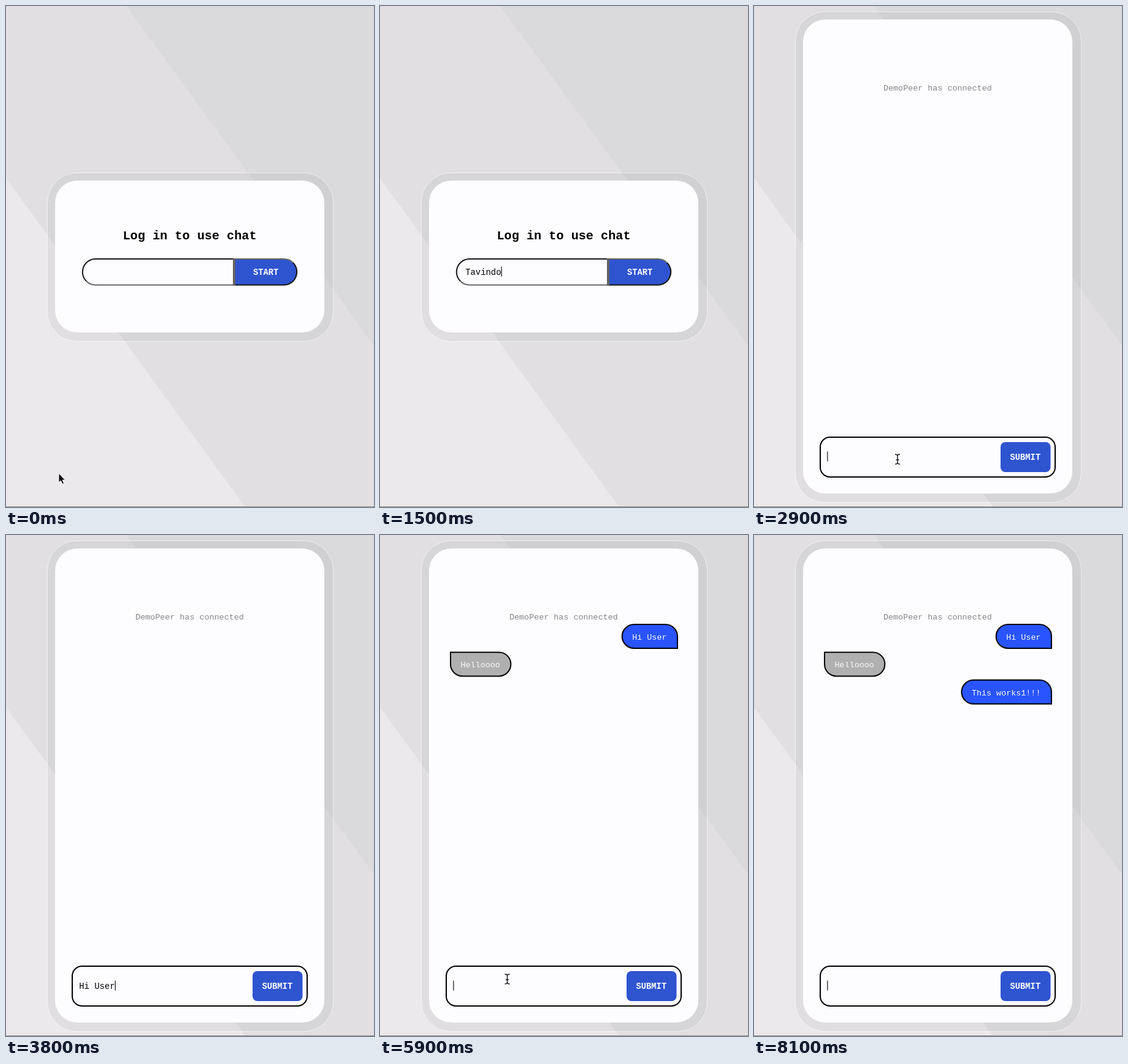
An HTML page that plays this animation: 600x818 px, repeating every 8200 ms.

```html
<!DOCTYPE html>
<html lang="en">
<head>
<meta charset="utf-8">
<title>Chat login</title>
<style>
  html, body { margin: 0; width: 100%; height: 100%; overflow: hidden; }
  svg { display: block; width: 600px; height: 818px; }
  text { font: 13.4px "Liberation Mono", "Courier New", monospace; white-space: pre; }
  .typed { font-size: 13.9px; }
  .label { font-size: 13.8px; font-weight: bold; fill: #fff; }
  .ring { fill: rgba(0, 0, 0, .046); stroke: rgba(255, 255, 255, .55); }
  .card { fill: #fdfcfe; }
  .button { fill: #2f54d0; }
  .line { fill: none; stroke-width: 2; }
  .dark { stroke: #161616; }
  .grey { stroke: #666; }
  .bubble { stroke: #000; stroke-width: 2; }
</style>
</head>
<body>
<svg viewBox="0 0 600 818">
  <rect width="600" height="818" fill="#e1dfe2"/>
  <path d="M196 0H600V554Z" fill="#dad9db"/>
  <path d="M0 281L390 818H0Z" fill="#ebe9ec"/>

  <g id="login">
    <rect class="ring" x="67.5" y="272.5" width="466" height="275" rx="48"/>
    <rect class="card" x="80" y="285" width="439" height="248" rx="36"/>
    <text x="190.5" y="381" style="font-size:20.2px;font-weight:bold">Log in to use chat</text>
    <path class="button" d="M372 413H453A21.2 21.2 0 0 1 453 455.4H372Z"/>
    <path class="line dark" d="M372 413H146A21.2 21.2 0 0 0 131 449.2"/>
    <path class="line grey" d="M131 449.2A21.2 21.2 0 0 0 146 455.4H372"/>
    <path class="line grey" d="M372 413H453A21.2 21.2 0 0 1 468 419.2"/>
    <path class="line dark" d="M468 419.2A21.2 21.2 0 0 1 453 455.4H372"/>
    <rect x="370" y="412" width="4" height="44.4" fill="#626262"/>
    <text class="label" x="403" y="439">START</text>
  </g>

  <g id="chat">
    <rect class="ring" x="67.5" y="9.5" width="466" height="801" rx="48"/>
    <rect class="card" x="80" y="22" width="439" height="774" rx="36"/>
    <text id="joined" x="211" y="138" fill="#858585">DemoPeer has connected</text>
    <g id="bubbles"></g>
    <rect class="line" x="108" y="704" width="383" height="65" rx="16" stroke="#000"/>
    <rect class="button" x="402" y="712" width="81.5" height="49" rx="8"/>
    <text class="label" x="417.5" y="741">SUBMIT</text>
  </g>

  <text class="typed" id="typed"></text>
  <rect id="caret" width="1.3" height="16" fill="#222"/>
  <path id="arrow" d="M0 0V15L3.4 12L6 17.6L8.5 16.5L6 11H10.5Z" stroke="#fff"/>
  <path id="beam" fill="none" stroke="#111" stroke-width="1.4"
    d="M-4-8Q0-8 0-5V5Q0 8-4 8M4-8Q0-8 0-5M0 5Q0 8 4 8M-2.5 1H2.5"/>
  <rect y="817" width="600" height="1" fill="#8c8c8c"/>
</svg>
<script>
const LOOP = 8200, STEP = 100, ADVANCE = .6, ENTER = 1600;
const $ = id => document.getElementById(id);
const show = (el, on) => el.style.display = on ? '' : 'none';

const messages = [
  { at: 4000, text: 'Hi User', mine: true },
  { at: 5500, text: 'Helloooo' },
  { at: 7900, text: 'This works1!!!', mine: true }
];
const sends = [0, ENTER, ...messages.filter(m => m.mine).map(m => m.at)];

// Keys pressed evenly from first to last; \b rubs out one letter
const bursts = [
  { first: 800, last: 1300, keys: 'Tavindop' },
  { first: 1500, last: 1500, keys: '\b' },
  { first: 3100, last: 3300, keys: 'Hi ' },
  { first: 3500, last: 3800, keys: 'User' },
  { first: 6300, last: 6900, keys: 'This works' },
  { first: 7200, last: 7600, keys: '1!!!' }
];

// The pointer glides to a field, clicks, and hides before typing
const glides = [
  { start: 0, stop: 300, hide: 600, from: [86, 763], to: [219, 440] },
  { start: 2500, stop: 2900, hide: 3100, from: [212, 774], to: [234, 740] },
  { start: 5600, stop: 5900, hide: 6300, from: [232, 748], to: [207.5, 725] }
];
const caretSpans = [[500, ENTER], [2800, 4500], [5700, 7900], [8100, LOOP]];

// The bubble's square corner is its origin; my own bubbles are turned half round
function addBubble(m, i) {
  const h = 39, r = h / 2, y = 146 + 45.4 * i;
  const w = m.text.length * 13.4 * ADVANCE + 34;
  const x = m.mine ? 485 - w : 115;
  const turn = m.mine ? `translate(485 ${y + h}) rotate(180)` : `translate(${x} ${y})`;
  $('bubbles').insertAdjacentHTML('beforeend', `<g>
    <path class="bubble" transform="${turn}" fill="${m.mine ? '#2954ff' : '#b0b0b0'}"
      d="M0 0H${w - r}a${r} ${r} 0 0 1 0 ${h}H${r}A${r} ${r} 0 0 1 0 ${r}Z"/>
    <text x="${x + 16.5}" y="${y + 25}" fill="#fafafa">${m.text}</text></g>`);
  m.el = $('bubbles').lastElementChild;
}
messages.forEach(addBubble);

function pointerAt(t) {
  const g = glides.find(g => t >= g.start && t < g.hide);
  if (!g) return null;
  const k = Math.min(1, (t - g.start) / (g.stop - g.start));
  const eased = k * k * (3 - 2 * k);
  return g.from.map((v, i) => v + (g.to[i] - v) * eased);
}

function typedAt(t) {
  const sent = sends.findLast(s => s <= t);
  return bursts.filter(b => b.first >= sent && b.first <= t).map(b => {
    const done = Math.min(1, (t - b.first + STEP) / (b.last - b.first + STEP));
    return b.keys.slice(0, Math.ceil(done * b.keys.length));
  }).join('').replace(/.\x08/g, '');
}

function draw(now) {
  const t = Math.floor(now % LOOP / STEP) * STEP;
  const login = t < ENTER;
  show($('login'), login);
  show($('chat'), !login);
  show($('joined'), t >= 2200);
  messages.forEach(m => show(m.el, t >= m.at));

  const [x, base] = login ? [139.2, 439] : [119.2, 741];
  const text = typedAt(t);
  $('typed').textContent = text;
  $('typed').setAttribute('x', x);
  $('typed').setAttribute('y', base);
  $('caret').setAttribute('x', x + text.length * 13.9 * ADVANCE);
  $('caret').setAttribute('y', base - 13.5);
  show($('caret'), caretSpans.some(([on, off]) => t >= on && t < off));

  const p = pointerAt(t);
  const [top, bottom] = login ? [412, 457] : [703, 770];
  const inField = p && p[1] > top && p[1] < bottom;
  show($('arrow'), p && !inField);
  show($('beam'), inField);
  if (p) for (const id of ['arrow', 'beam']) $(id).setAttribute('transform', `translate(${p})`);
}

let start;
function frame(now) {
  start ??= now;
  draw(now - start);
  requestAnimationFrame(frame);
}
draw(0);
requestAnimationFrame(frame);
</script>
</body>
</html>
```
